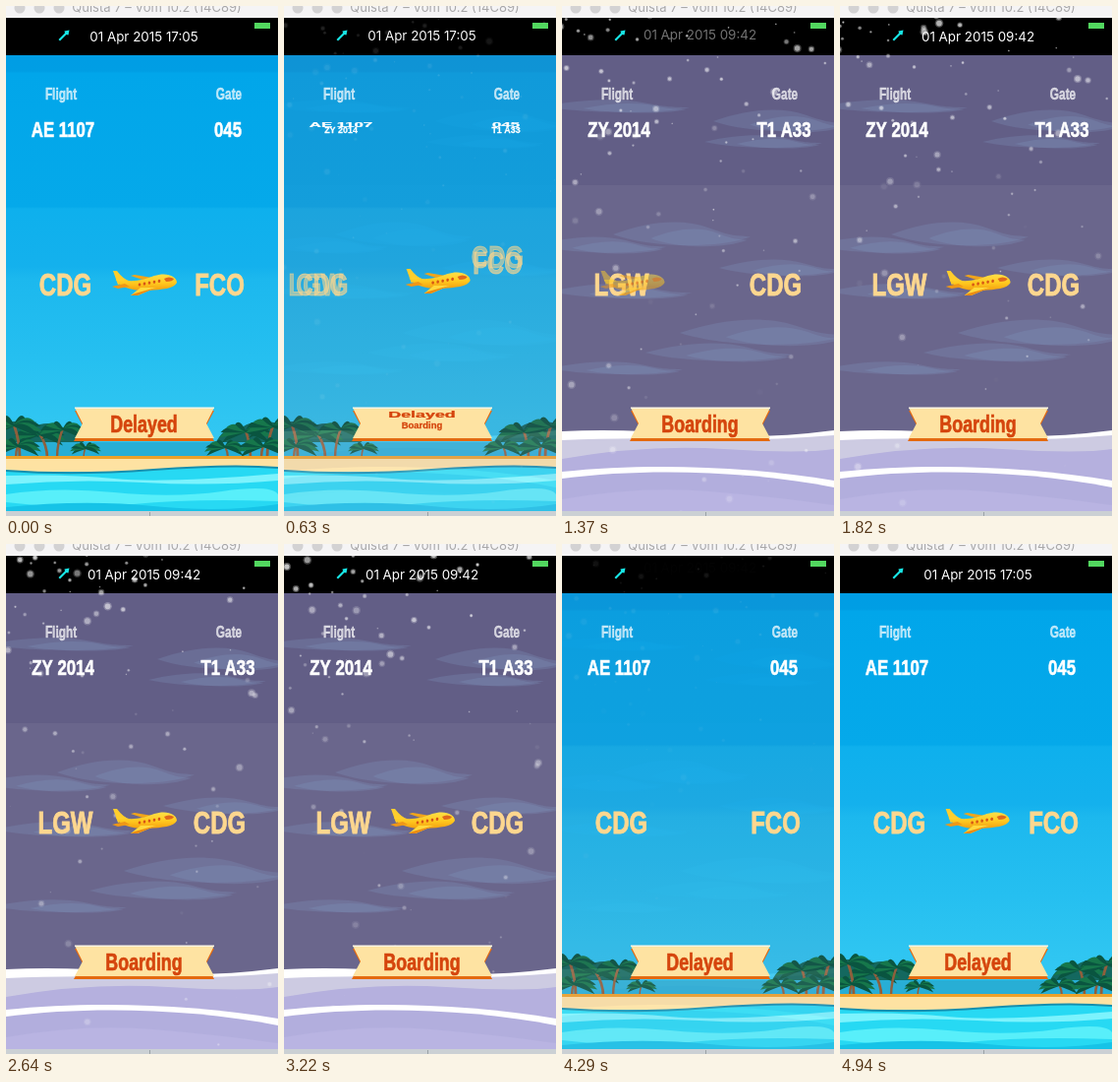
An HTML page with a canvas that plays this animation: 277 by 518 pixels, repeating every 5920 ms.

```html
<!DOCTYPE html>
<html lang="en">
<head>
<meta charset="utf-8">
<title>Flight board</title>
<style>
  html, body { margin: 0; width: 100%; height: 100%; overflow: hidden; background: #000; }
  canvas { display: block; width: 277px; height: 518px; }
</style>
</head>
<body>
<canvas id="stage" width="277" height="518"></canvas>
<script>
const W = 277, H = 518, LOOP = 5920, TAU = Math.PI * 2;
const TO_WINTER = 360, TO_SUMMER = 3512, FLIGHT = 1500;
const CONDENSED = 0.75; // one width for the narrow headline face
const ctx = document.getElementById('stage').getContext('2d');

const summer = { number: 'AE 1107', gate: '045', depart: 'CDG', arrive: 'FCO',
                 status: 'Delayed', date: '01 Apr 2015 17:05' };
const winter = { number: 'ZY 2014', gate: 'T1 A33', depart: 'LGW', arrive: 'CDG',
                 status: 'Boarding', date: '01 Apr 2015 09:42' };

const clamp = v => Math.max(0, Math.min(1, v));
const part = (t, from, to) => clamp((t - from) / (to - from));

// Cubic Bézier easing with control points (x1, 0) and (x2, 1).
function bezier(x1, x2) {
  return x => {
    if (x <= 0 || x >= 1) return clamp(x);
    let lo = 0, hi = 1, s;
    for (let i = 0; i < 20; i++) {
      s = (lo + hi) / 2;
      const at = 3 * x1 * s * (1 - s) ** 2 + 3 * x2 * s * s * (1 - s) + s ** 3;
      if (at < x) lo = s; else hi = s;
    }
    return s * s * (3 - 2 * s);
  };
}
const easeIn = bezier(0.42, 1), easeOut = bezier(0, 0.58), easeInOut = bezier(0.42, 0.58);

function randomizer(seed) {
  return () => (seed = (seed * 16807) % 2147483647) / 2147483647;
}

function shape(g, color, path) {
  g.fillStyle = color;
  g.fill(new Path2D(path));
}

function ellipse(g, color, x, y, rx, ry, turn = 0) {
  g.fillStyle = color;
  g.beginPath();
  g.ellipse(x, y, rx, ry, turn, 0, TAU);
  g.fill();
}

function rect(g, color, x, y, w, h) {
  g.fillStyle = color;
  g.fillRect(x, y, w, h);
}

function scene(draw) {
  const layer = document.createElement('canvas');
  layer.width = W;
  layer.height = H;
  draw(layer.getContext('2d'));
  return layer;
}

function palm(g, x, y, r, baseX) {
  g.strokeStyle = '#8f5f3c';
  g.lineWidth = r / 10;
  g.beginPath();
  g.moveTo(baseX, 459);
  g.quadraticCurveTo(baseX, (y + 459) / 2, x, y);
  g.stroke();
  for (let i = 0; i < 11; i++) {
    const a = Math.PI * (0.85 + i * 0.13);
    const tx = x + r * Math.cos(a), ty = y + r * (0.5 * Math.sin(a) + 0.24);
    const mx = x + (tx - x) * 0.6, my = (y + ty) / 2;
    shape(g, i % 2 ? '#16774b' : '#0a5540',
      `M${x} ${y} Q${mx} ${my - r * 0.36} ${tx} ${ty} Q${mx} ${my + r * 0.06} ${x} ${y + 2}Z`);
  }
}

// A flat wisp: two pointed lenses of the same translucent tone.
function cloud(g, x, y, rx, ry) {
  const lens = (cx, cy, w, h) => shape(g, 'rgba(132,154,196,0.24)',
    `M${cx - w} ${cy} C${cx - w / 2} ${cy - h} ${cx} ${cy - h * 1.3} ${cx + w * 0.4} ${cy - h * 0.5}
     S${cx + w * 0.8} ${cy} ${cx + w} ${cy + h * 0.2} C${cx + w / 2} ${cy + h * 1.2} ${cx - w / 2} ${cy + h} ${cx - w} ${cy}Z`);
  lens(x, y, rx, ry);
  lens(x + rx * 0.25, y + ry * 0.3, rx * 0.7, ry * 0.75);
}

const beach = scene(g => {
  const sky = g.createLinearGradient(0, 50, 0, 455);
  [[0, '#009de4'], [0.04, '#009ee4'], [0.045, '#01a6ea'], [0.38, '#05a9ea'],
   [0.385, '#0eb0ed'], [0.53, '#14b1ed'], [0.56, '#1cb8ee'], [0.75, '#25bff0'],
   [1, '#35c9f2']].forEach(([at, color]) => sky.addColorStop(at, color));
  rect(g, sky, 0, 50, W, 463);
  shape(g, '#14685f', 'M0 424 Q15 418 27 428 Q42 420 58 428 Q74 434 82 446 V459 H0Z');
  shape(g, '#14685f', 'M277 424 Q255 418 240 428 Q225 426 217 438 L203 459 H277Z');
  rect(g, '#28aed5', 0, 443, W, 15);
  palm(g, 34, 434, 27, 42);
  palm(g, 8, 425, 29, 14);
  palm(g, 58, 429, 24, 52);
  palm(g, 12, 446, 24, 10);
  palm(g, 81, 448, 16, 79);
  palm(g, 223, 447, 21, 226);
  palm(g, 244, 431, 27, 249);
  palm(g, 272, 426, 28, 266);
  palm(g, 262, 446, 26, 260);
  rect(g, '#eda129', 0, 457, W, 5);
  shape(g, '#fee2a2', 'M0 460 H277 V473 H0Z');
  shape(g, '#168fae', 'M0 471 Q70 476 150 470 T277 468 V513 H0Z');
  shape(g, '#27d9f3', 'M0 473 Q70 478 150 472 T277 470 V513 H0Z');
  shape(g, '#7cf3fd', 'M0 477 Q60 475 110 480 T277 475 V482 Q210 488 140 484 T0 486Z');
  shape(g, '#58effa', 'M0 496 Q50 488 110 494 T220 493 T277 496 V503 Q190 500 130 506 T0 504Z');
  shape(g, '#16c3e7', 'M0 509 Q80 501 150 508 T277 506 V513 H0Z');
});

const snowfield = scene(g => {
  rect(g, '#6a668c', 0, 50, W, 463);
  rect(g, '#625e86', 0, 50, W, 132);
  const clouds = [[55, 102, 75, 7], [222, 117, 68, 12], [205, 138, 60, 7], [122, 232, 70, 13],
    [40, 243, 66, 9], [222, 266, 62, 9], [60, 290, 72, 8], [205, 332, 85, 14],
    [160, 352, 75, 10], [55, 368, 68, 7]];
  for (const [x, y, rx, ry] of clouds) cloud(g, x, y, rx, ry);
  shape(g, '#fff', 'M0 432 Q60 429 130 435 T277 431 V513 H0Z');
  shape(g, '#cdcbe2', 'M0 441 Q60 438 130 440 T277 436 V513 H0Z');
  shape(g, '#b5b0de', 'M0 460 Q85 445 165 450 T277 450 V513 H0Z');
  shape(g, '#fff', 'M0 473 C85 464 190 467 277 482 V513 H0Z');
  shape(g, '#b2aedd', 'M0 480 C85 469 190 472 277 489 V513 H0Z');
  shape(g, '#b9b4e2', 'M0 501 Q80 487 150 493 T277 507 V513 H0Z');
});

const random = randomizer(4711);
const FLAKES = 125, LIFE = 5.5;
const flakes = Array.from({ length: FLAKES }, (_, i) => ({
  x: W * random() ** 1.5, birth: i * LIFE / FLAKES, drift: random() * 16 - 14,
  speed: 8 + random() * 16, size: 0.7 + 3 * random() ** 1.4,
  alpha: 0.6 + random() * 0.4, fading: 0.12 + random() * 0.2
}));

function drawSnow(seconds, mix) {
  ctx.save();
  ctx.beginPath();
  ctx.rect(0, 12, W, 501);
  ctx.clip();
  for (const f of flakes) {
    const age = (seconds + f.birth) % LIFE;
    const x = f.x + f.drift * age + 3.7 * age * age;
    const y = f.speed * age + 20 * age * age;
    const alpha = mix * f.alpha * clamp(1 - f.fading * age);
    ctx.globalAlpha = alpha * 0.4;
    ellipse(ctx, '#fff', x, y, f.size * 1.2, f.size * 1.2);
    ctx.globalAlpha = alpha * 0.75;
    ellipse(ctx, '#fff', x, y, f.size * 0.8, f.size * 0.8);
  }
  ctx.restore();
}

// Draws heavy condensed text centred on (x, y).
function label(text, x, y, size, color, alpha = 1, sx = 1, sy = 1) {
  ctx.save();
  ctx.globalAlpha = alpha;
  ctx.translate(x, y);
  ctx.scale(CONDENSED * sx, sy);
  ctx.font = `bold ${size}px "Liberation Sans", Arial, sans-serif`;
  ctx.textAlign = 'center';
  ctx.fillStyle = ctx.strokeStyle = color;
  ctx.lineWidth = size * 0.03;
  ctx.fillText(text, 0, size * 0.335);
  ctx.strokeText(text, 0, size * 0.335);
  ctx.restore();
}

function plainText(text, x, y, size, color, alpha = 1) {
  ctx.globalAlpha = alpha;
  ctx.font = `${size}px Inter, "Liberation Sans", sans-serif`;
  ctx.textAlign = 'center';
  ctx.fillStyle = color;
  ctx.fillText(text, x, y);
  ctx.globalAlpha = 1;
}

function cubeLabel(from, to, x, y, size, color, reach, t, dir) {
  const p = easeOut(part(t, 0, 500));
  if (p < 1) label(from, x, y + dir * reach * p, size, color, 1, 1, 1 - 0.9 * p);
  if (p > 0) label(to, x, y - dir * 3 * (1 - p), size, color, 1, p ** 2, p ** 3);
}

function slideLabel(from, to, x, y, dx, dy, t) {
  const out = easeIn(part(t, 0, 500)), back = 1 - easeIn(part(t, 100, 350));
  const color = '#fdd78f';
  label(to, x + dx * back, y + dy * back, 32, color, 1 - back);
  label(from, x + dx * out, y + dy * out, 32, color, 1 - out);
}

function drawDate(from, to, t) {
  const leaving = t < 830;
  const shown = leaving ? 1 - easeInOut(part(t, 200, 830)) : easeOut(part(t, 830, 1430));
  const lift = leaving ? easeOut(part(t, 200, 830)) : 1 - easeOut(part(t, 830, 1200));
  plainText(leaving ? from : to, 140.5, 36 - 7 * lift, 13.4, '#fff', shown);
}

function drawPlane(t) {
  const p = easeInOut(part(t, 0, FLIGHT));
  let x = 141, y = 282, alpha = 1, turn = 0;
  if (p < 0.51) {
    const roll = part(p, 0, 0.25), climb = part(p, 0.25, 0.5);
    x += 59 * roll + 74 * climb;
    y -= 7.4 * roll + 37 * climb;
    alpha = 1 - climb;
    turn = -Math.PI / 8 * part(p, 0.1, 0.5);
  } else {
    alpha = part(p, 0.55, 1);
    x *= alpha;
  }
  ctx.save();
  ctx.globalAlpha = alpha;
  ctx.translate(x, y);
  ctx.rotate(turn);
  const body = ctx.createLinearGradient(0, -10, 0, 9);
  body.addColorStop(0, '#ffe14a');
  body.addColorStop(0.5, '#ffc81e');
  body.addColorStop(1, '#f0930d');
  shape(ctx, '#f1a51a', 'M-2 -4 L-14 -8 L-10 -9 L8 -6Z');
  shape(ctx, '#ffce2c', 'M-32 -13 L-28 -13 Q-22 -5 -16 -3 L-27 1Z');
  shape(ctx, body, 'M-29 -4 C-26 3 -12 8 4 7 C18 6 30 5 33 -1 C33 -8 22 -12 10 -8 C0 -4 -12 -1 -22 -4Z');
  shape(ctx, '#ef9717', 'M-33 3 L-20 0 L-15 3 L-27 5Z');
  shape(ctx, '#ffd83c', 'M-4 4 L12 4 L-7 12 L-14 12Z');
  shape(ctx, '#eb8a12', 'M12 4 L-7 12 L-14 12 L-10 10Z');
  for (let i = 0; i < 5; i++) ellipse(ctx, '#d75516', -5 + i * 5, 1 - i * 0.9, 1.3, 1.6, 0.2);
  shape(ctx, '#e0681c', 'M20 -5 Q25 -8 30 -5 Q29 -2 22 -2Z');
  ctx.restore();
}

function drawRibbon() {
  shape(ctx, '#e46a10', 'M70 411 L78 426 L69 442 H212 L204 426 L212 411Z');
  shape(ctx, '#fee3a2', 'M70 408 H212 L204 424 L212 439 H70 L78 424Z');
  rect(ctx, '#fff6e2', 70, 407.5, 142, 1.5);
}

function drawWindow() {
  rect(ctx, '#f5f4f5', 0, 0, W, 12);
  for (const x of [14, 34, 54]) ellipse(ctx, '#d3d2d3', x, 2, 5.5, 5.5);
  plainText('Quista 7 – Vom 10.2 (14C89)', 153.5, 6, 13, '#a9a8a9');
  rect(ctx, '#cbd0d4', 0, 513, W, 5);
  rect(ctx, '#9aa1a6', 146, 514, 1, 4);
}

function drawStatusBar() {
  rect(ctx, '#000', 0, 12, W, 38);
  rect(ctx, '#52d75f', 253, 17, 16, 6);
  shape(ctx, '#18e5e5', 'M53.5 34 L60 27.5 L59.5 25.5 L64.5 24.5 L63.5 29.5 L61.5 29 L55 35.5Z');
}

function draw(now) {
  const time = now % LOOP;
  const toSummer = time >= TO_SUMMER;
  const t = Math.max(0, time - (toSummer ? TO_SUMMER : TO_WINTER));
  const [from, to, dir] = toSummer ? [winter, summer, 1] : [summer, winter, -1];
  const fade = easeInOut(part(t, 0, 1000));
  const cold = toSummer ? 1 - fade : fade;

  ctx.globalAlpha = 1;
  ctx.drawImage(beach, 0, 0);
  ctx.globalAlpha = cold;
  ctx.drawImage(snowfield, 0, 0);
  ctx.globalAlpha = 1;
  drawStatusBar();
  if (cold > 0) drawSnow(time / 1000, cold);
  drawWindow();
  drawDate(from.date, to.date, t);

  label('Flight', 56, 89.5, 15.8, '#fff', 0.72);
  label('Gate', 227, 89.5, 15.8, '#fff', 0.72);
  cubeLabel(from.number, to.number, 58, 125, 22.4, '#fff', 6.5, t, dir);
  cubeLabel(from.gate, to.gate, 226, 125, 22.4, '#fff', 6.5, t, dir);
  slideLabel(from.depart, to.depart, 60.5, 283, dir * 60, 0, t);
  slideLabel(from.arrive, to.arrive, 217.5, 283, 0, dir * 60, t);
  drawPlane(t);
  drawRibbon();
  cubeLabel(from.status, to.status, 140.5, 425, 23.8, '#d5450d', 14, t, dir);
}

const start = performance.now();
function tick() {
  draw(performance.now() - start);
  requestAnimationFrame(tick);
}
tick();
</script>
</body>
</html>
```
